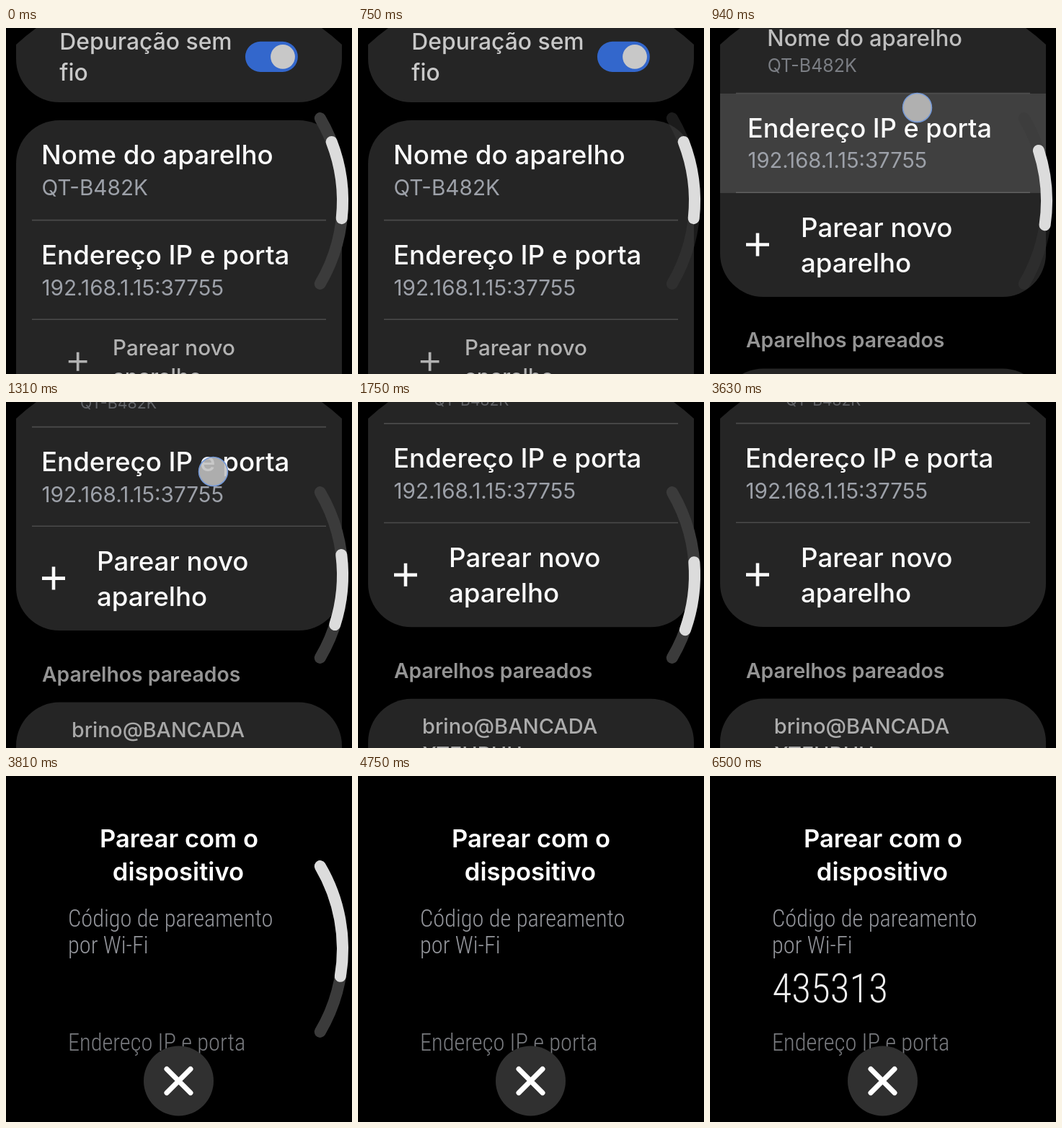
These frames come from a looping animation (480 px wide and 480 px high, 8000 ms). An HTML page:

```html
<!DOCTYPE html>
<html lang="pt-BR">
<head>
<meta charset="utf-8">
<title>Parear aparelho</title>
<style>
  html, body { margin: 0; width: 100%; height: 100%; overflow: hidden; background: #000; }
  svg { display: block; width: 100%; height: 100%; }
  text { font-family: Inter, "Open Sans", sans-serif; fill: #fafafa; white-space: pre; }
  .title { font-size: 36.7px; font-weight: 450; }
  .sub { font-size: 29.7px; fill: #9da1a9; }
  .section { font-size: 28.3px; font-weight: 600; fill: #949494; }
  .head { font-size: 34.6px; font-weight: 600; fill: #fff; text-anchor: middle; }
  .body, .code { font-family: "Roboto Condensed", Roboto, sans-serif; font-stretch: 75%; font-weight: 300; }
  .body { font-size: 32.4px; fill: #94969c; }
  .code { font-size: 55px; fill: #f0f0f0; }
  .tight .body { letter-spacing: -.06em; }
  .tight .code { letter-spacing: -.08em; }
  .card { fill: #252525; }
  .line { stroke: #4b4b4b; stroke-width: 1.6; }
  .arc { fill: none; stroke-width: 16; stroke-linecap: round; }
</style>
</head>
<body>
<svg id="stage" viewBox="0 0 480 480" preserveAspectRatio="xMidYMid meet">
  <defs>
    <clipPath id="screen"><path d="M14 23A312 312 0 0 1 42 0H438A312 312 0 0 1 466 23V480H14Z"/></clipPath>
    <clipPath id="group"><rect x="14" y="128" width="452" height="421" rx="60"/></clipPath>
  </defs>
  <rect width="480" height="480" fill="#000"/>
  <g id="list" clip-path="url(#screen)">
    <g id="scroll">
      <rect class="card" x="14" y="-180" width="452" height="283" rx="60"/>
      <rect class="card" x="14" y="128" width="452" height="421" rx="60"/>
      <rect class="card" x="14" y="648.6" width="452" height="290" rx="60"/>
      <path class="line" d="M36 266.6H444"/>
      <path class="line" id="line2" d="M36 404.3H444"/>
      <g clip-path="url(#group)" fill="#fff">
        <rect id="press1" x="14" y="267" width="452" height="138"/>
        <rect id="press2" x="14" y="403.6" width="452" height="146"/>
      </g>
      <text class="section" x="50" y="619.5">Aparelhos pareados</text>
      <g id="items"></g>
    </g>
  </g>
  <g id="dialog">
    <rect width="480" height="480" fill="#000"/>
    <text class="head" x="240" y="99">Parear com o</text>
    <text class="head" x="239" y="145">dispositivo</text>
    <text class="body" id="probe" x="86" y="208.5">Código de pareamento</text>
    <text class="body" x="86" y="246">por Wi-Fi</text>
    <text class="code" id="code" x="86.5" y="313.5">435313</text>
    <text class="body" x="86" y="380.5" opacity=".82">Endereço IP e porta</text>
    <circle cx="239.5" cy="423" r="48.5" fill="#303030"/>
    <path d="M223 406.5l33 33m0-33l-33 33" stroke="#fff" stroke-width="7" stroke-linecap="round"/>
  </g>
  <path id="track" class="arc" stroke="#3b3b3b"/>
  <path id="thumb" class="arc" stroke="#dcdcdc"/>
  <circle id="dot" r="20" fill="#c2c2c2" fill-opacity=".87" stroke="#7499d8" stroke-width="1.5"/>
</svg>
<script>
const LOOP = 8000, END = 237;
const $ = id => document.getElementById(id);
const set = (el, attrs) => { for (const k in attrs) el.setAttribute(k, attrs[k]); };
const text = (cls, x, y, s) => `<text class="${cls}" x="${x}" y="${y}">${s}</text>`;
const two = (x, a, b) => text('title', x, 61, a) + text('title', x, 110, b);
const pair = (a, b) => text('title', 49, 61, a) + text('sub', 49.5, 103.5, b);

// List rows: top and height in list space, content relative to the top.
const rows = [
  { y: -42, h: 145, html: two(49, 'Depuração sem', 'fio') +
      '<rect x="346" y="48" width="84" height="48.5" rx="24.2" fill="#387cff"/>' +
      '<circle cx="406" cy="72.3" r="19.5" fill="#fafafa"/>' },
  { y: 128, h: 139, html: pair('Nome do aparelho', 'QT-B482K') },
  { y: 267, h: 138, html: pair('Endereço IP e porta', '192.168.1.15:37755') },
  { y: 405, h: 144, html: two(126, 'Parear novo', 'aparelho') +
      '<path d="M50 71.6H82M66 55.6V87.6" stroke="#fafafa" stroke-width="4.6"/>' },
  { y: 649, h: 290, html: two(49, 'brino@BANCADA', 'XTFUBUH') }
];
for (const row of rows) {
  row.el = document.createElementNS('http://www.w3.org/2000/svg', 'g');
  row.el.innerHTML = row.html;
  $('items').appendChild(row.el);
}
// Without a condensed face, close up the letters instead.
if ($('probe').getComputedTextLength() > 300) $('dialog').classList.add('tight');

// Linear interpolation through [time, value] stops.
function key(t, stops) {
  let [t0, v0] = stops[0];
  for (const [t1, v1] of stops) {
    if (t < t1) return t1 > t0 ? v0 + (v1 - v0) * (t - t0) / (t1 - t0) : v0;
    t0 = t1; v0 = v1;
  }
  return v0;
}

function arc(from, to) {
  const at = deg => {
    const a = deg * Math.PI / 180;
    return `${(240 + 227 * Math.cos(a)).toFixed(2)} ${(240 + 227 * Math.sin(a)).toFixed(2)}`;
  };
  return `M${at(from)}A227 227 0 0 1 ${at(to)}`;
}

// Rows shrink and fade towards the upper and lower screen edges.
function placeRow(row, scroll, press) {
  const top = row.y - scroll, bottom = top + row.h;
  const edge = d => Math.min(1, .643 + .00218 * d);
  const up = edge(bottom), down = edge(480 - top);
  const k = Math.max(.3, Math.min(up, down));
  const pivot = k === 1 ? row.h / 2 : up < down ? row.h : 0;
  const size = k * (1 - .016 * press);
  set(row.el, {
    transform: `translate(240 ${row.y + pivot}) scale(${size}) translate(-240 ${-pivot})`,
    opacity: Math.max(0, 1 - (1 - k) * 1.75)
  });
}

function drawList(t) {
  const scroll = t < 870 ? 0 : END * (1 - Math.exp((740 - t) / 148));
  const press1 = key(t, [[870, 0], [930, 1], [1000, 1], [1240, 0]]);
  const press2 = key(t, [[2030, 0], [2290, 1], [2700, 1], [3500, 0]]);
  set($('scroll'), { transform: `translate(0 ${-scroll})` });
  set($('press1'), { opacity: .12 * press1 });
  set($('press2'), { opacity: .2 * press2 });
  set($('line2'), { opacity: 1 - .8 * press2 });
  rows.forEach((row, i) => placeRow(row, scroll, i === 2 ? press1 : i === 3 ? press2 : 0));
}

function drawBar(t) {
  const open = t >= 3810;
  const start = open ? -30.4 : key(t, [[0, -21.2], [870, -21.2], [940, -18], [1310, -7.1], [1630, -4.5]]);
  const span = open ? 40 : key(t, [[870, 27.3], [940, 26.4], [1310, 24.8], [1630, 24.1]]);
  const shown = t < 2500 || (open && t < 4750);
  const fade = open ? 1 : key(t, [[1900, 1], [2310, .36]]);
  const dim = open ? 1 : key(t, [[300, 1], [810, .4], [940, .4], [1200, 1]]);
  set($('track'), { d: arc(-30.4, 30.4), opacity: shown ? fade * dim : 0 });
  set($('thumb'), { d: arc(start, start + span), opacity: shown ? fade : 0 });
}

function drawDot(t) {
  const first = t >= 870 && t < 1690, second = t >= 2060 && t < 2500;
  set($('dot'), {
    cx: first ? 287.5 : 263,
    cy: first ? key(t, [[940, 110.5], [1310, 96.5]]) : 236,
    opacity: first || second ? 1 : 0
  });
}

function draw(t) {
  drawList(t);
  drawBar(t);
  drawDot(t);
  set($('dialog'), { opacity: t < 3690 ? 0 : t < 3810 ? .55 : 1 });
  set($('code'), { opacity: t >= 6500 ? 1 : 0 });
}

const began = performance.now();
function tick() {
  draw((performance.now() - began) % LOOP);
  requestAnimationFrame(tick);
}
tick();
</script>
</body>
</html>
```
